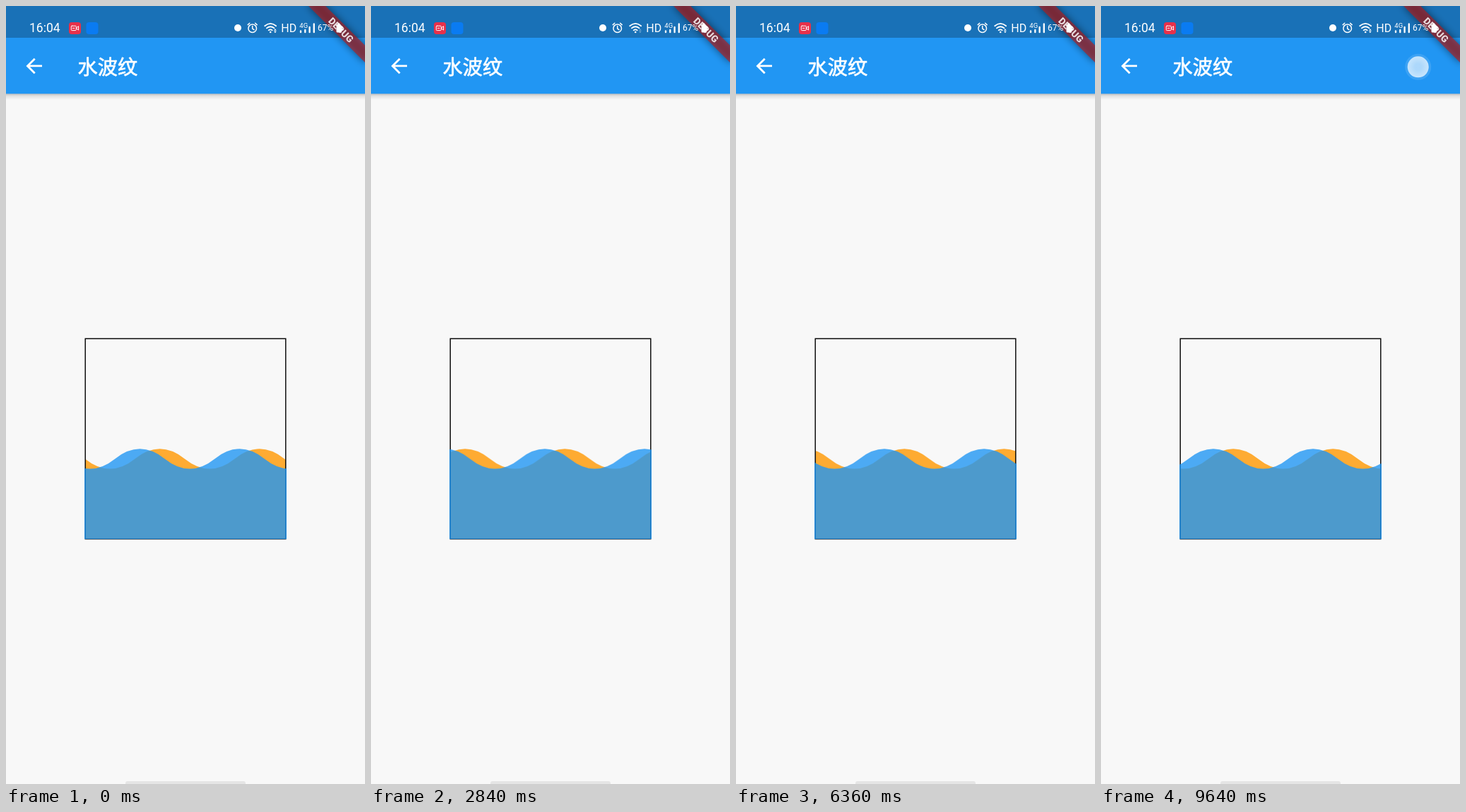
Write an HTML page that moves like this. It is 508x1102 px and loops after 9680 ms.

```html
<!DOCTYPE html>
<html lang="zh-CN">
<head>
<meta charset="utf-8">
<title>水波纹</title>
<style>
  html, body { margin: 0; width: 100%; height: 100%; overflow: hidden; background: #f8f8f8; }
  svg { display: block; width: 100%; height: 100%; }
  text { font-family: Roboto, "Noto Sans", sans-serif; fill: #fff; }
  .title {
    font: 500 28.2px "Noto Sans CJK SC", "Noto Sans CJK", sans-serif;
    stroke: #fff; stroke-width: .7px;
  }
  .line { fill: none; stroke: #fff; stroke-linecap: round; stroke-linejoin: round; }

  .wave { animation: drift 9680ms -4ms infinite; }
  .touch { animation: tap 9680ms -4ms step-end infinite; }
  .traffic { animation: blink 9680ms -4ms step-end infinite; }

  /* 40 ms ticks, so each span has its own step count */
  @keyframes drift {
    0%       { transform: translateX(0);       animation-timing-function: steps(40); }
    16.5289% { transform: translateX(111.6px); animation-timing-function: steps(31); }
    29.3388% { transform: translateX(197.6px); animation-timing-function: steps(35); }
    43.8016% { transform: translateX(295.7px); animation-timing-function: steps(53); }
    65.7024% { transform: translateX(443.8px); animation-timing-function: steps(46); }
    84.7107% { transform: translateX(573.9px); animation-timing-function: steps(36); }
    99.5867%, 100% { transform: translateX(675px); }
  }
  @keyframes tap {
    0% { opacity: 0; }
    98.7603%, 100% { opacity: 1; }
  }
  @keyframes blink {
    0%, 34%, 90% { opacity: 1; }
    22%, 78% { opacity: .35; }
  }
</style>
</head>
<body>
<svg viewBox="0 0 508 1102" preserveAspectRatio="none">
  <defs>
    <linearGradient id="shade" x2="0" y2="1">
      <stop offset="0" stop-color="#000" stop-opacity=".24"/>
      <stop offset=".4" stop-color="#000" stop-opacity=".09"/>
      <stop offset="1" stop-color="#000" stop-opacity="0"/>
    </linearGradient>
    <radialGradient id="finger">
      <stop offset=".3" stop-color="#fff" stop-opacity=".58"/>
      <stop offset="1" stop-color="#fff" stop-opacity=".72"/>
    </radialGradient>
    <filter id="soft" x="-30%" y="-120%" width="160%" height="340%">
      <feGaussianBlur stdDeviation="5.6"/>
    </filter>
    <clipPath id="inner"><rect x="112.9" y="472" width="282.2" height="282.1"/></clipPath>
    <clipPath id="outer"><rect x="111.5" y="472" width="285" height="282.1"/></clipPath>
  </defs>

  <rect width="508" height="1102" fill="#f8f8f8"/>

  <!-- app bar -->
  <rect y="124" width="508" height="9" fill="url(#shade)"/>
  <rect width="508" height="124.3" fill="#2196f3"/>
  <rect width="508" height="45" fill="#1971b7"/>
  <path transform="translate(22.8 68) scale(1.411)" fill="#fff"
        d="M20 11H7.83l5.59-5.59L12 4l-8 8 8 8 1.41-1.41L7.83 13H20z"/>
  <text class="title" x="101.6" y="97">水波纹</text>

  <!-- water tank -->
  <g clip-path="url(#inner)">
    <g class="wave"><path data-shift="28.2" fill="#ff9800" fill-opacity=".8"/></g>
  </g>
  <rect x="112.2" y="471.2" width="283.6" height="283.6" fill="none" stroke="#000" stroke-width="1.42"/>
  <g clip-path="url(#outer)">
    <g class="wave"><path data-shift="0" fill="#2196f3" fill-opacity=".8"/></g>
  </g>

  <!-- corner banner -->
  <g transform="translate(508 0) rotate(45)">
    <rect x="-57" y="39.5" width="114" height="17" fill="#000" fill-opacity=".5" filter="url(#soft)"/>
    <rect x="-57" y="39.5" width="114" height="17" fill="#b71c1c" fill-opacity=".627"/>
    <text y="52.8" font-size="13.6" font-weight="900" text-anchor="middle" fill-opacity=".82">DEBUG</text>
  </g>

  <!-- status bar -->
  <text x="33" y="37.3" font-size="17.5">16:04</text>
  <rect x="89" y="23" width="17" height="17" rx="4" fill="#e8304a"/>
  <g class="line" stroke-width="1">
    <rect x="92.3" y="28.2" width="7" height="6.4" rx="1"/>
    <path d="M99.6 31l3-2.3v5.4l-3-2.3M94.3 31.4h2.6"/>
  </g>
  <rect x="113.5" y="23" width="17" height="17" rx="4" fill="#0a7bf2"/>
  <circle cx="328" cy="31" r="5" fill="#fff"/>
  <g class="line" stroke-width="1.5">
    <circle cx="348.7" cy="31.7" r="5.8"/>
    <path d="M348.7 28.5v3.6l2.3 1.5M342.2 26.6l2.6-2.3M355.2 26.6l-2.6-2.3"/>
  </g>
  <g class="line" stroke-width="1.8">
    <path d="M366.2 28.2q8-6.6 16 0M368.9 31.4q5.3-4.3 10.6 0"/>
    <path d="M371.7 34.4q2.5-1.9 5 0"/>
  </g>
  <circle cx="374.2" cy="37" r="1.3" fill="#fff"/>
  <path class="traffic" d="M379 34.7l1.9-2.4 1.9 2.4zM379 35.8l1.9 2.4 1.9-2.4z" fill="#fff"/>
  <text x="389.3" y="37" font-size="16">HD</text>
  <text x="415.3" y="31" font-size="9.5">4G</text>
  <path class="line" stroke-width="2.3" d="M417 35.5v1.7M423.3 34v3.2M429.6 30v7.2M435.8 25.5v11.7"/>
  <text x="441" y="35.3" font-size="12">67%</text>
  <rect x="467.5" y="26" width="6.5" height="11.5" rx="1.5" fill="#fff"/>
  <path d="M469.3 26v-1.4h3V26zM474 28l3 2-1.4 1.5L477 34l-3 2z" fill="#fff"/>

  <g class="touch">
    <circle cx="448.7" cy="86.3" r="18.5" fill="#fff" fill-opacity=".12"/>
    <circle cx="448.7" cy="86.3" r="15" fill="url(#finger)"/>
  </g>

  <path d="M169 1102v-1q0-3 3-3h164q3 0 3 3v1z" fill="#e5e5e5"/>
</svg>
<script>
  const HALF = 70.55, LEVEL = 641.4, SWELL = 28.2, FLOOR = 755;

  // Alternating parabolic arcs, long enough to slide for a whole loop.
  function wavePath(shift) {
    const left = 154.2 - HALF * 12 + shift;
    const arcs = `q${HALF / 2} ${-SWELL} ${HALF} 0` + `t${HALF} 0`.repeat(21);
    return `M${left} ${LEVEL}${arcs}V${FLOOR}H${left}z`;
  }

  for (const p of document.querySelectorAll('[data-shift]'))
    p.setAttribute('d', wavePath(+p.dataset.shift));
</script>
</body>
</html>
```
